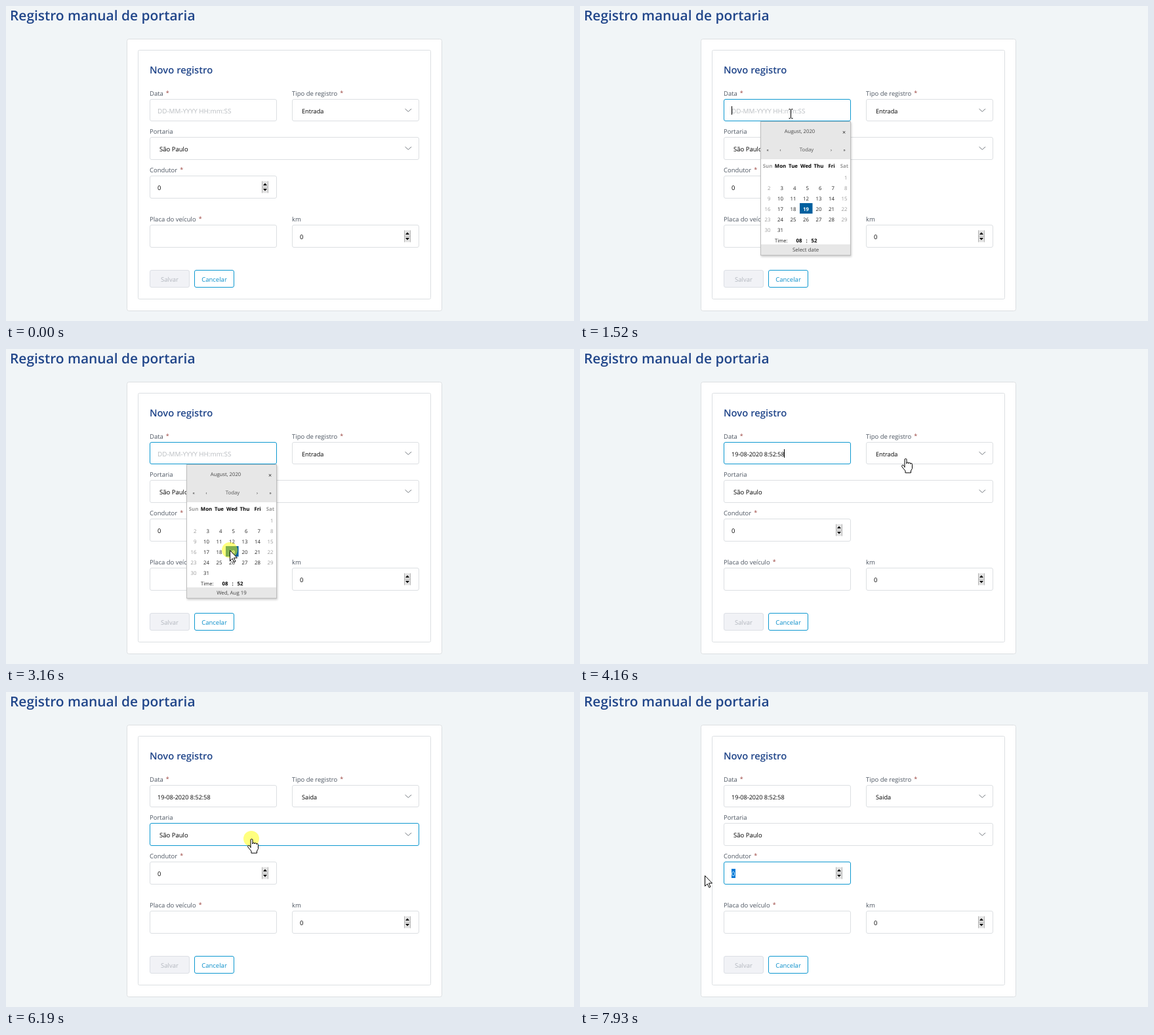
Animation, 866 px wide and 481 px high, one loop 8000 ms. Source, as an HTML page:

```html
<!DOCTYPE html>
<html lang="pt-BR">
<head>
<meta charset="utf-8">
<title>Registro manual de portaria</title>
<style>
html, body { margin: 0; width: 100%; height: 100%; overflow: hidden; background: #f1f5f7; }
svg { display: block; width: 100%; height: 100%; font-family: "Open Sans", "Noto Sans", sans-serif; text-rendering: geometricPrecision; }
text { white-space: pre; }
</style>
</head>
<body>
<svg id="stage" viewBox="0 0 866 481" xmlns="http://www.w3.org/2000/svg"></svg>
<script>
const LOOP = 8000, TICK = 77;
const BLUE = '#0078d7', FOCUS = '#0d98d0', LINE = '#dcdfe2', HOVER = '#c3c8cc', TITLE = '#21468a';

const attrs = o => Object.entries(o).map(([k, v]) => `${k}="${v}"`).join(' ');
const text = (x, y, s, size = 9.4, fill = '#000', more = {}) =>
  `<text ${attrs({ x, y, 'font-size': size, fill, ...more })}>${s}</text>`;
const fillBox = (x, y, width, height, fill, more = {}) =>
  `<rect ${attrs({ x, y, width, height, fill, ...more })}/>`;
// Box with a one pixel border inside its outer size
const box = (x, y, w, h, fill = '#fff', stroke = LINE, more = {}) =>
  fillBox(x + .5, y + .5, w - 1, h - 1, fill, { stroke, ...more });
const group = (id, s) => `<g id="${id}">${s}</g>`;

// Form fields
const LEFT = 219, RIGHT = 436, HALF = 194, FULL = RIGHT + HALF - LEFT;
const field = (label, required, type, x, y, w = HALF, h = 35) => ({ label, required, type, x, y, w, h });
const fields = {
  data: field('Data', true, 'text', LEFT, 142, HALF, 34),
  tipo: field('Tipo de registro', true, 'select', RIGHT, 142, HALF, 34),
  portaria: field('Portaria', false, 'select', LEFT, 200, FULL),
  condutor: field('Condutor', true, 'number', LEFT, 259),
  placa: field('Placa do veículo', true, 'text', LEFT, 334),
  km: field('km', false, 'number', RIGHT, 334)
};

const chevron = (x, y) => `<path d="M${x} ${y}l4.8 4.3 4.8-4.3" fill="none" stroke="#777d83"/>`;
const spinner = (x, y) =>
  fillBox(x, y, 10, 18, '#e3e3e3') +
  `<path d="M${x} ${y + 9}h10M${x + .5} ${y}v18M${x + 9.5} ${y}v18" stroke="#b4b4b4"/>` +
  `<path d="M${x + 2} ${y + 6.5}h6l-3-3.5zM${x + 2} ${y + 11.5}h6l-3 3.5z"/>`;

function drawField([id, f]) {
  const star = f.required ? '<tspan dx="4" dy="-1" font-size="9" fill="#9c4540">*</tspan>' : '';
  const end = f.x + f.w;
  return text(f.x, f.y - 5, f.label + star, 9.5, '#4d5662') +
    box(f.x, f.y, f.w, f.h, '#fff', LINE, { id, rx: 2.5 }) +
    (f.type === 'select' ? chevron(end - 21.5, f.y + 15) : '') +
    (f.type === 'number' ? spinner(end - 23, f.y + 8.5) + text(f.x + 12, f.y + 22, '0', 9.4, '#000', { id: id + 'Value' }) : '');
}

const button = (x, s, fill, stroke, color, weight) =>
  box(x, 403, 61, 27, fill, stroke, { rx: 2.5 }) +
  text(x + 30.5, 421, s, 9.5, color, { 'text-anchor': 'middle', 'font-weight': weight });

// Calendar of August 2020, whose first day is a Saturday
const COL = 19.5, ROW = 16, GRID_X = 276.5, GRID_Y = 253, TODAY = 19, OFFSET = 5;
const dayNames = ['Sun', 'Mon', 'Tue', 'Wed', 'Thu', 'Fri', 'Sat'];
const centred = (x, y, s, size = 7.8, fill = '#222', more = {}) =>
  text(x, y, s, size, fill, { 'text-anchor': 'middle', ...more });
const bold = { 'font-weight': 700 };

function calendar() {
  let s = box(275, 176, 138, 205, '#fff', '#bdbdbd', { style: 'filter:drop-shadow(1px 2px 1.5px #0003)' }) +
    fillBox(276, 177, 136, 57, '#e7e7e7') + fillBox(276, 364, 136, 16, '#e7e7e7') +
    centred(335, 194, 'August, 2020', 7.7, '#444') + centred(402.5, 196, '×', 9) +
    centred(286, 222, '«', 6.5) + centred(305.5, 222, '‹', 6.5) + centred(345.5, 222, 'Today', 7.8, '#555') +
    centred(383, 222, '›', 6.5) + centred(403, 222, '»', 6.5) +
    fillBox(0, 0, COL, ROW, '#cfe2f8', { id: 'hoverDay' });
  dayNames.forEach((d, i) => s += centred(286 + COL * i, 247, d, 7.8, i % 6 ? '#000' : '#999', bold));
  for (let day = 1; day <= 31; day++) {
    const cell = day + OFFSET, col = cell % 7, row = Math.floor(cell / 7), today = day === TODAY;
    const x = GRID_X + COL * col, y = GRID_Y + ROW * row;
    if (today) s += fillBox(x, y, COL, ROW, '#00609f');
    s += text(x + 14, y + 12, day, 7.8, today ? '#fff' : col % 6 ? '#222' : '#999',
      { 'text-anchor': 'end', 'font-weight': today ? 700 : 400 });
  }
  return s + text(297, 361, 'Time:', 7.6, '#222') + centred(334, 361, '08', 7.8, '#000', bold) +
    centred(345.5, 361, ':', 7.8, '#000', bold) + centred(357, 361, '52', 7.8, '#000', bold) +
    centred(344, 375, '', 7.9, '#444', { id: 'status' });
}

document.getElementById('stage').innerHTML =
  fillBox(0, 0, 866, 481, '#f1f5f7') +
  text(6, 22, 'Registro manual de portaria', 20.9, TITLE, { 'font-weight': 600 }) +
  box(184, 50, 481, 416, '#fff', LINE, { rx: 3 }) + box(201, 67, 447, 381, '#fff', LINE, { rx: 2 }) +
  text(LEFT, 103, 'Novo registro', 14.8, TITLE, { 'font-weight': 600 }) +
  fillBox(231, 270, 6, 14, BLUE, { id: 'mark' }) +
  Object.entries(fields).map(drawField).join('') +
  text(231, 164, 'DD-MM-YYYY HH:mm:SS', 9.9, '#b9bdc1', { id: 'hint' }) +
  text(231, 164, '19-08-2020 8:52:58', 9.1, '#000', { id: 'date' }) +
  fillBox(231, 153, 1, 13, '#000', { id: 'caret' }) +
  text(451, 164, '', 9.2, '#000', { id: 'kind' }) + text(234, 222, 'São Paulo', 9.5) +
  button(LEFT, 'Salvar', '#f1f2f6', '#dcdfe5', '#b3b7bf', 400) +
  button(287, 'Cancelar', '#fff', FOCUS, '#0a8fca', 500) +
  group('calendar', calendar()) +
  group('kindList', box(435, 176, 194, 40, '#fff', '#8a9299') +
    fillBox(436, 196, 192, 19.5, BLUE, { id: 'kindRow' }) +
    text(442, 190, 'Entrada', 9.2, '#000', { id: 'first' }) + text(442, 210, 'Saida', 9.2, '#000', { id: 'second' })) +
  group('gateList', box(LEFT, 235, 410, 21, BLUE, '#8a9299') + text(225, 249, 'São Paulo', 9.5, '#fff')) +
  group('pointer',
    '<circle id="ring" r="12" fill="#ff0" fill-opacity=".5"/>' +
    '<path id="arrow" d="M.5.5V16.5L4.2 13 6.8 18.5 9 17.5 6.4 12H11.5Z" fill="#fff" stroke="#000"/>' +
    '<path id="hand" d="M-1 14V2Q-1 .5 .5 .5T2 2V8Q2 6 3.5 6T5 8Q5 6.5 6.5 6.5T8 8.5Q8 7.5 9.2 7.5T10.5 9.5V15.5L8.5 19V22H0V19L-5 13Q-6 11-4.5 10.2T-1 13" fill="#fff" stroke="#000"/>' +
    '<path id="beam" d="M-2.5-6.5H-.5L.5-5.5 1.5-6.5H3.5M.5-6V7M-2.5 7.5H-.5L.5 6.5 1.5 7.5H3.5" fill="none" stroke="#000"/>');

const el = {};
document.querySelectorAll('[id]').forEach(e => el[e.id] = e);
el.mark.parentNode.insertBefore(el.mark, el.condutorValue);
const set = (id, k, v) => el[id].setAttribute(k, v);
const show = (id, on) => set(id, 'display', on ? 'inline' : 'none');
const within = (t, a, b) => t >= a && t < b;
const inside = ([x, y], f) => within(x, f.x, f.x + f.w) && within(y, f.y, f.y + f.h);

// Mouse presses
const ENTER = 450, RING = 100;
const press = { date: 1380, day: 3160, kind: 4540, option: 5490, gate: 6190, gateAgain: 6670, drag: 7510 };
const release = { day: 3240, drag: 7850 };

// Pointer moves: start, duration, destination
const home = [395, 454];
const moves = [
  [ENTER, 540, 321, 172], [1140, 80, 321, 164], [1540, 520, 332, 309], [2140, 80, 341, 307],
  [3800, 320, 496, 167], [4230, 310, 480, 171], [4770, 300, 463, 198], [5100, 80, 461, 205],
  [5560, 310, 374, 224], [6890, 460, 243, 277], [press.drag, 180, 185, 279], [release.drag, 70, 190, 280]
];

function pointerAt(time) {
  const t = Math.floor((time + 10) / TICK) * TICK - 10;
  return moves.reduce(([x, y], [start, length, toX, toY]) => {
    const u = Math.min(1, Math.max(0, (t - start) / length));
    return [x + (toX - x) * u, y + (toY - y) * u];
  }, home).map(Math.round);
}

function focusAt(t) {
  return t >= press.drag ? 'condutor' : t >= press.gate ? 'portaria' : t >= press.kind ? 'tipo' :
    t >= press.date ? 'data' : '';
}
const blink = (t, start) => Math.floor((t - start) / 530) % 2 === 0;

function draw(t) {
  const p = pointerAt(t), [x, y] = p, focus = focusAt(t);
  const calOpen = within(t, press.date + TICK, release.day);
  const kindOpen = within(t, press.kind + TICK, press.option + TICK);
  const gateOpen = within(t, press.gate + TICK, press.gateAgain);
  const filled = t >= release.day, marked = t >= press.drag + TICK;

  const trail = pointerAt(t - 90), free = t >= ENTER && !calOpen && !kindOpen && !gateOpen;
  for (const id in fields)
    set(id, 'stroke', id === focus ? FOCUS : free && inside(trail, fields[id]) ? HOVER : LINE);

  show('hint', !filled);
  show('date', filled);
  set('caret', 'x', filled ? 311 : 231);
  show('caret', focus === 'data' && blink(t, filled ? 2940 : press.date + 20));
  el.kind.textContent = t >= press.option + TICK ? 'Saida' : 'Entrada';
  show('mark', marked);
  set('condutorValue', 'fill', marked ? '#fff' : '#000');

  show('calendar', calOpen);
  const col = Math.floor((x - GRID_X) / COL), row = Math.floor((y - GRID_Y) / ROW);
  const day = row * 7 + col - OFFSET;
  const onDay = within(col, 0, 7) && within(day, 1, 32);
  show('hoverDay', onDay);
  set('hoverDay', 'x', GRID_X + COL * col);
  set('hoverDay', 'y', GRID_Y + ROW * row);
  el.status.textContent = onDay ? `${dayNames[col]}, Aug ${day}` : 'Select date';

  show('kindList', kindOpen);
  const lower = y >= 196;
  set('kindRow', 'y', lower ? 196 : 177);
  set('first', 'fill', lower ? '#000' : '#fff');
  set('second', 'fill', lower ? '#fff' : '#000');
  show('gateList', gateOpen);

  const over = Object.values(fields).find(f => inside(p, f));
  const onList = kindOpen || calOpen && y > 176 || within(t, press.gate + TICK, press.gateAgain + 220);
  const shape = !over || onList ? 'arrow' : over.type === 'select' ? 'hand' : 'beam';
  show('pointer', t >= ENTER);
  set('pointer', 'transform', `translate(${x} ${y})`);
  ['arrow', 'hand', 'beam'].forEach(id => show(id, id === shape));
  show('ring', Object.entries(press).some(([k, at]) => within(t, at, release[k] || at + RING)));
}

const start = performance.now();
function frame() {
  draw((performance.now() - start) % LOOP);
  requestAnimationFrame(frame);
}
frame();
</script>
</body>
</html>
```
